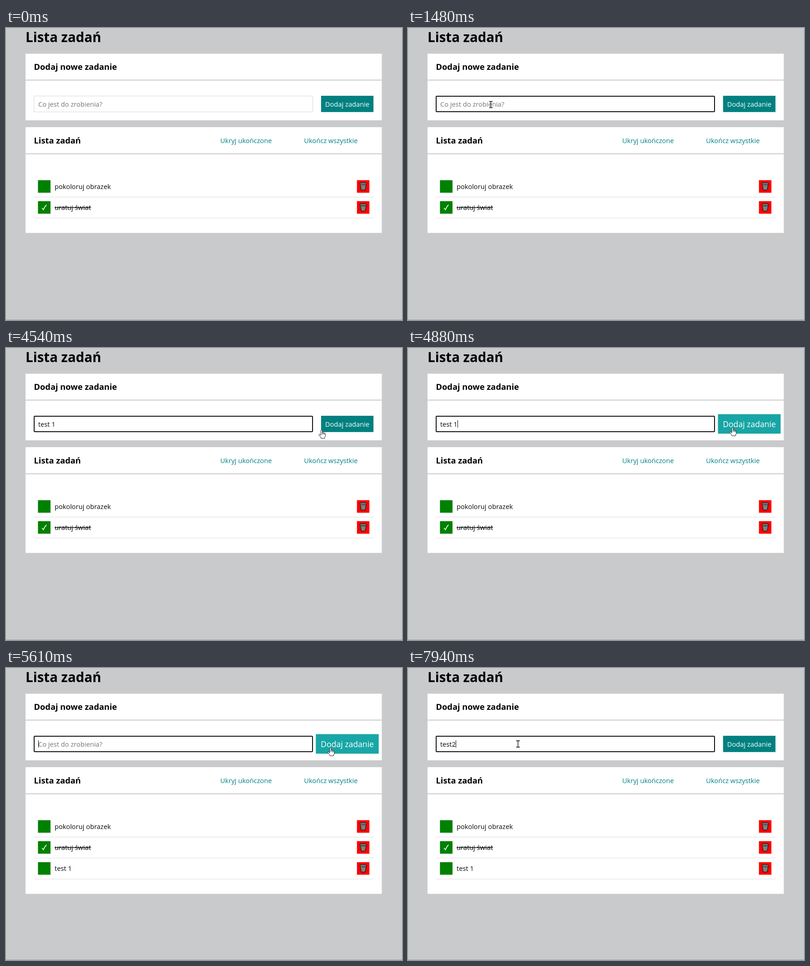
These frames come from a looping animation (872 px wide and 642 px high, 8 s). An HTML page:

```html
<!DOCTYPE html>
<html lang="pl">
<head>
<meta charset="utf-8">
<title>Lista zadań</title>
<style>
  html, body { margin: 0; width: 100%; height: 100%; overflow: hidden; background: #c9cacc; }
  svg { display: block; }
  text { font: 14.7px "Open Sans", "Noto Sans", sans-serif; fill: #0a0a0a; white-space: pre; }
  .title { font-size: 29.5px; font-weight: 700; fill: #000; }
  .head { font-size: 18.3px; font-weight: 700; fill: #000; }
  .link { fill: #008080; }
  .hint { fill: #757575; }
  .done { text-decoration: line-through; }
  .card { fill: #fff; }
  .line { fill: #c9cacc; }
  .rule { fill: #ddd; }
</style>
</head>
<body>
<svg width="872" height="642" viewBox="0 0 872 642">
  <defs>
    <pattern id="mesh" width="2.4" height="2.4" patternUnits="userSpaceOnUse" patternTransform="rotate(45)">
      <rect width="2.4" height="2.4" fill="#a4a4a4"/>
      <path d="M0 0H2.4M0 0V2.4" stroke="#4c4c4c" stroke-width="1.1"/>
    </pattern>
    <g id="bin" stroke="#1c1c1c" stroke-width="1.3" stroke-linejoin="round">
      <path d="M-6.6-5.2L-4.6 7Q0 9.4 4.6 7L6.6-5.2Z" fill="url(#mesh)"/>
      <ellipse cy="-6" rx="7.2" ry="2.5" fill="#8d8d8d"/>
      <path d="M-4.4-6H4.4" stroke="#5a5a5a" stroke-width="1"/>
    </g>
  </defs>

  <rect width="872" height="642" fill="#c9cacc"/>
  <rect y="641" width="872" height="1" fill="#a0a1a3"/>
  <text class="title" x="43" y="31">Lista zadań</text>

  <rect class="card" x="43" y="56.5" width="784.5" height="146.5"/>
  <rect class="line" x="43" y="113.5" width="784.5" height="2"/>
  <text class="head" x="61.5" y="92">Dodaj nowe zadanie</text>
  <rect id="field" fill="#fff"/>
  <text id="value" x="70.9" y="172.5"></text>
  <rect id="caret" y="159" width="1" height="16"/>

  <rect id="list" class="card" x="43" y="218" width="784.5"/>
  <rect class="line" x="43" y="275.5" width="784.5" height="2"/>
  <text class="head" x="61.5" y="253.6">Lista zadań</text>
  <text class="link" x="471.8" y="252.8">Ukryj ukończone</text>
  <text class="link" x="656.2" y="252.8">Ukończ wszystkie</text>
  <g id="rows"></g>

  <g id="button">
    <rect id="face" x="-57.7" y="-17.9" width="115.4" height="35.8"/>
    <text y="5.6" text-anchor="middle" style="fill:#fff">Dodaj zadanie</text>
  </g>

  <circle id="halo" r="11" fill="#ff0" fill-opacity=".55"/>
  <g id="cursor">
    <path id="beam" d="M-4-7H-1L0-6.2L1-7H4M0-6.2V6.2M-4 7H-1L0 6.2L1 7H4" fill="none" stroke="#000" stroke-width="1.3"/>
    <path id="arrow" d="M0 0V14L3.2 11L5.5 16.2L7.9 15.2L5.6 10.2H10.2Z" fill="#fff" stroke="#222" stroke-width=".9"/>
    <g id="hand" stroke="#222" stroke-width="1" stroke-linejoin="round">
      <path d="M-1.5 1Q0-1 1.5 1V6.2Q3.2 5.2 4.1 6.8Q5.6 6 6.4 7.5Q8.2 7 8.4 9V13.5Q8 15.5 7 16.5V18.5H-1.5V16.8L-5.8 11.4Q-6.6 9.4-4.4 9.6L-1.5 12Z" fill="#fff"/>
      <path d="M1.5 6V10M4.1 7V10.3M6.4 8V10.5" fill="none"/>
    </g>
  </g>
</svg>
<script>
const LOOP = 8000, STEP = 1000 / 15;
const ADDED = 5410;

const $ = id => document.getElementById(id);
const set = (el, attrs) => { for (const k in attrs) el.setAttribute(k, attrs[k]); };
const show = (el, on) => set(el, { visibility: on ? 'visible' : 'hidden' });
const within = (t, a, b) => t >= a && t < b;

// [time, x, y] of the pointer's hot spot
const path = [
  [60, 751, 617], [200, 685, 560], [330, 520, 430], [470, 325, 275], [600, 215, 190], [720, 182.5, 168.3],
  [3780, 182.5, 168.3], [3900, 225, 176], [4050, 340, 193], [4200, 500, 199], [4350, 620, 194],
  [4460, 680, 184], [4525, 693.5, 180.3], [4600, 706, 177], [4730, 714.5, 174.5],
  [5600, 714.5, 174.5], [5680, 690, 169], [5760, 600, 158], [5860, 430, 152], [5950, 300, 160], [6050, 242.3, 167]
];

// [time, field content]
const typing = [
  [0, ''], [1930, 't'], [2200, 'te'], [2400, 'tes'], [2730, 'test'], [3130, 'test '], [3590, 'test 1'],
  [ADDED, ''], [6750, 't'], [6950, 'te'], [7150, 'tes'], [7410, 'test'], [7940, 'test2']
];

const caretOn = [[940, 1480], [1930, 4090], [4590, 5210], [ADDED, 5910], [6480, LOOP]];
const clicks = [[940, 1070, 182, 168], [5210, ADDED, 713.3, 176.5], [6140, 6280, 241, 166.5]];

function pointer(t) {
  const i = path.findIndex(p => p[0] > t);
  if (i === 0) return path[0].slice(1);
  if (i < 0) return path[path.length - 1].slice(1);
  const [a, b] = [path[i - 1], path[i]], k = (t - a[0]) / (b[0] - a[0]);
  return [a[1] + (b[1] - a[1]) * k, a[2] + (b[2] - a[2]) * k];
}

function hover(t) {
  const ramp = from => {
    const k = Math.min(1, Math.max(0, (t - from) / 400));
    return 1 - (1 - k) ** 3 * (1 + k);
  };
  return ramp(4570) - ramp(5690);
}

function addRow(label, y, done) {
  $('rows').insertAdjacentHTML('beforeend', `<g transform="translate(0 ${y})">
    <rect x="70.4" y="-13.8" width="27.6" height="27.6" fill="#008000"/>
    ${done ? '<path d="M79.3 1.2L82.4 5.3Q84.8-1.5 89.2-5.6" fill="none" stroke="#fff" stroke-width="1.5"/>' : ''}
    <text class="${done ? 'done' : ''}" x="107" y="5.6">${label}</text>
    <rect x="772.8" y="-13.8" width="27.4" height="27.6" fill="#f00"/>
    <use href="#bin" x="786.6" y="0"/>
    <rect class="rule" x="61.5" y="22.8" width="747.8" height="1"/>
  </g>`);
}

addRow('pokoloruj obrazek', 348.4);
addRow('uratuj świat', 394.5, true);
addRow('test 1', 440.7);
const newRow = $('rows').lastElementChild;

function drawField(t) {
  const focus = within(t, 940, 5210) || t >= ADDED;
  set($('field'), focus
    ? { x: 62, y: 150, width: 613, height: 34, rx: 1.5, stroke: '#101010', 'stroke-width': 2 }
    : { x: 61.5, y: 149.5, width: 614, height: 35, rx: 0, stroke: '#d6d6d6', 'stroke-width': 1 });
  const text = typing.filter(s => s[0] <= t).pop()[1], value = $('value');
  value.textContent = text || 'Co jest do zrobienia?';
  value.setAttribute('class', text ? '' : 'hint');
  show($('caret'), caretOn.some(c => within(t, c[0], c[1])));
  const width = text ? value.getComputedTextLength() : 0;
  set($('caret'), { x: Math.round(70.9 + width) });
}

function drawButton(t) {
  const h = hover(t);
  set($('button'), { transform: `translate(751.5 166.9) scale(${1 + .2 * h})` });
  set($('face'), { fill: `rgb(${24 * h},${128 + 38 * h},${128 + 38 * h})` });
}

function drawPointer(t) {
  const [x, y] = pointer(Math.floor(t / STEP + .02) * STEP);
  const inField = x > 61 && x < 676 && y > 149 && y < 185;
  const onButton = x > (t > 4570 ? 682 : 694) && x < 821 && y > 145 && y < 189;
  const kind = inField ? 'beam' : onButton ? 'hand' : 'arrow';
  for (const k of ['beam', 'hand', 'arrow']) show($(k), t >= 70 && k === kind);
  set($('cursor'), { transform: `translate(${x} ${y})` });
  const click = clicks.find(c => within(t, c[0], c[1]));
  show($('halo'), click);
  if (click) set($('halo'), { cx: click[2], cy: click[3] });
}

function draw(t) {
  const added = t >= ADDED;
  set($('list'), { height: added ? 278.6 : 232.5 });
  show(newRow, added);
  drawField(t);
  drawButton(t);
  drawPointer(t);
}

const start = performance.now();
function tick() {
  draw((performance.now() - start) % LOOP);
  requestAnimationFrame(tick);
}
tick();
</script>
</body>
</html>
```
